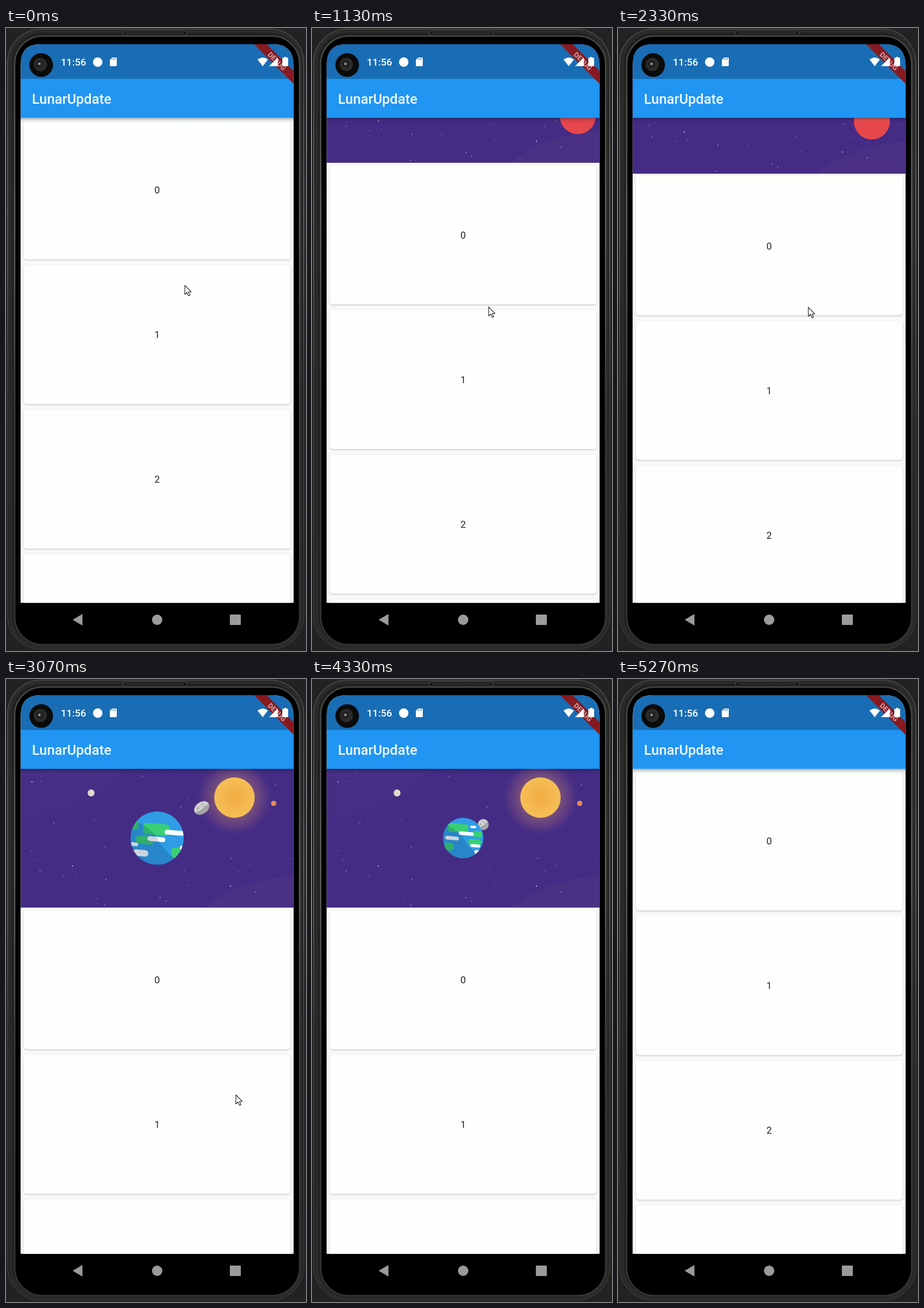
An HTML page that plays this animation: 520 px wide and 1077 px high, repeating every 5.39 s.

```html
<!DOCTYPE html>
<html lang="en">
<head>
<meta charset="utf-8">
<title>Pull to refresh</title>
<style>
  html, body { margin: 0; width: 100%; height: 100%; overflow: hidden; background: #212221; }
  svg { display: block; width: 100vw; height: 100vh; }
  text { font-family: Roboto, "Noto Sans", sans-serif; }
  .num { font-size: 16.8px; fill: #222; text-anchor: middle; }
  .card { fill: #fdfffc; filter: drop-shadow(0 1px 1px rgba(0,0,0,.24)); }
</style>
</head>
<body>
<svg viewBox="0 0 520 1077" preserveAspectRatio="none">
  <defs>
    <linearGradient id="metal" x2="0" y2="1">
      <stop offset="0" stop-color="#434542"/><stop offset=".3" stop-color="#5c5e5b"/>
      <stop offset=".6" stop-color="#3b3d3a"/><stop offset="1" stop-color="#333532"/>
    </linearGradient>
    <linearGradient id="drop" x2="0" y2="1">
      <stop offset="0" stop-color="#000" stop-opacity=".3"/>
      <stop offset=".4" stop-color="#000" stop-opacity=".1"/>
      <stop offset="1" stop-color="#000" stop-opacity="0"/>
    </linearGradient>
    <radialGradient id="sun">
      <stop offset="0" stop-color="#f2ab42"/><stop offset="1" stop-color="#f5c057"/>
    </radialGradient>
    <radialGradient id="glow">
      <stop offset=".5" stop-color="#c98a68" stop-opacity=".42"/>
      <stop offset=".78" stop-color="#a0647a" stop-opacity=".26"/>
      <stop offset="1" stop-color="#6a4080" stop-opacity="0"/>
    </radialGradient>
    <clipPath id="screen"><path d="M25.600 993.500V62Q25.600 28 60 28H462Q498.300 28 498.300 64V993.500Z"/></clipPath>
    <clipPath id="sky"><rect x="25" y="0" width="474" height="240.500"/></clipPath>
    <clipPath id="disc"><circle r="1"/></clipPath>
  </defs>

  <!-- phone body -->
  <rect x="3" y="2" width="513" height="1072" rx="58" fill="#1f211f" stroke="url(#metal)" stroke-width="2"/>
  <rect x="8" y="6" width="503" height="1064" rx="53" fill="none" stroke="#2a2c2a" stroke-width="5"/>
  <rect x="15" y="14" width="494" height="1052" rx="48" fill="#000" stroke="url(#metal)" stroke-width="2.500"/>
  <rect x="203" y="5" width="111" height="8" rx="4" fill="#171817" stroke="#4c4d4c" stroke-width="1"/>
  <path d="M208 9H310" stroke="#404140" stroke-width="3" stroke-dasharray="1.5 1.5"/>

  <g clip-path="url(#screen)">
    <rect x="25" y="28" width="474" height="966" fill="#f8f9f7"/>
    <g id="scene" clip-path="url(#sky)">
      <rect x="25" width="474" height="241" fill="#442c85"/>
      <path d="M25 85Q150 75 212 0H25Z" fill="#4a2f86" opacity=".6"/>
      <path d="M345 241Q395 195 499 185V241Z" fill="#4c3385" opacity=".75"/>
      <g id="stars" fill="#d8d0ee"></g>
      <circle cx="147.500" cy="42" r="6" fill="#e2dac8"/>
      <circle cx="464" cy="60" r="4.600" fill="#e48a5a"/>
      <g id="red">
        <circle r="31" fill="#ee5254"/>
        <path d="M-31 0A31 31 0 0 0 31 0Z" fill="#e6474b"/>
      </g>
      <circle cx="396" cy="50" r="66" fill="url(#glow)"/>
      <circle cx="396" cy="50" r="35" fill="url(#sun)"/>
      <g id="orange">
        <circle r="190" fill="#e9835f"/>
        <path d="M100 -16L187 -34A190 190 0 0 1 100 161Z" fill="#eb977b"/>
      </g>
      <g id="orbit" transform="translate(262 120)">
        <g id="earth"><g clip-path="url(#disc)">
          <rect x="-1" y="-1" width="2" height="2" fill="#2f9de6"/>
          <g id="land"></g>
          <path d="M-.9 -.7Q-.1 -.3 .05 .1Q.3 .5 .68 .78L0 1.2H-1.2Z" fill="#07204a" opacity=".18"/>
        </g></g>
        <g id="moon">
          <circle r="10" fill="#cfcfcf"/>
          <path d="M-10 0A10 10 0 0 0 10 0Q0 4 -10 0Z" fill="#a4a4a6"/>
          <g fill="#b0b0b2"><circle cx="-4" cy="-3" r="2"/><circle cx="3" cy="-5" r="1.400"/><circle cx="4" cy="1" r="1.800"/></g>
        </g>
      </g>
    </g>
    <g id="list"><rect x="25" y="155.400" width="474" height="1100" fill="#f8f9f7"/></g>
    <rect x="25" y="155.400" width="474" height="9" fill="url(#drop)"/>

    <!-- bars -->
    <rect x="25" y="28" width="474" height="60" fill="#196db4"/>
    <rect x="25" y="88" width="474" height="67.400" fill="#2095f2"/>
    <text x="45" y="131" font-size="24" font-weight="500" fill="#f4faff">LunarUpdate</text>
    <path d="M430 28H452L499 75V97Z" fill="#861a21"/>
    <text transform="translate(469.500 57.500) rotate(45)" y="4.200" font-size="12.200" font-weight="700" text-anchor="middle" fill="#cfa6aa">DEBUG</text>
    <text x="95" y="65.200" font-size="17.300" font-weight="500" fill="#fff">11:56</text>
    <g fill="#fff">
      <circle cx="159" cy="59" r="8.200"/>
      <path d="M184 51H191Q192 51 192 52V65Q192 66 191 66H181Q180 66 180 65V55Z"/>
      <path d="M436 54.500Q445 47.500 454 54.500L445 66Z"/>
      <path d="M456 66L471 51V66Z"/>
      <path d="M482 51.500V50H486V51.500H488Q489 51.500 489 52.500V65Q489 66 488 66H480Q479 66 479 65V52.500Q479 51.500 480 51.500Z"/>
    </g>
    <path d="M184 52V55M187 52V55M189.500 52V55" stroke="#196db4"/>
  </g>

  <!-- camera -->
  <circle cx="61" cy="64" r="20.500" fill="#0b0b0b"/>
  <circle cx="59.500" cy="63" r="11.500" fill="#2b2b2a"/>
  <circle cx="58.500" cy="62.500" r="7" fill="#222322"/>
  <circle cx="58" cy="62" r="2" fill="#a5a5a5"/>

  <!-- navigation -->
  <g fill="#9b9b9b">
    <path d="M115.500 1023L132.500 1013V1033Z"/>
    <circle cx="262" cy="1023" r="9"/>
    <rect x="388" y="1014" width="19" height="18" rx="1"/>
  </g>
  <path id="cursor" d="M0 0V15.500L3.600 12.200L6.300 18L8.800 16.900L6.200 11.200H11Z" fill="#fff" stroke="#222" stroke-width="1.100" stroke-linejoin="round"/>
</svg>
<script>
const LOOP = 5390, STEP = 200 / 3;
const $ = id => document.getElementById(id);

function add(parent, tag, attrs, text) {
  const el = document.createElementNS("http://www.w3.org/2000/svg", tag);
  for (const k in attrs) el.setAttribute(k, attrs[k]);
  if (text !== undefined) el.textContent = text;
  return parent.appendChild(el);
}
const move = (el, x, y, more = "") => el.setAttribute("transform", `translate(${x} ${y}) ${more}`);

// Eased value(s) of a table whose rows are [key, ...values].
function at(table, key) {
  if (key <= table[0][0]) return table[0].slice(1);
  for (let i = 1; i < table.length; i++) {
    const a = table[i - 1], b = table[i];
    if (key <= b[0]) {
      const p = (key - a[0]) / (b[0] - a[0]), e = p * p * (3 - 2 * p);
      return a.slice(1).map((v, j) => v + (b[j + 1] - v) * e);
    }
  }
  return table[table.length - 1].slice(1);
}

const pull = [[67, 0], [733, 66], [1270, 80], [1670, 80], [1800, 81], [2333, 96.5],
  [2800, 234], [2930, 240], [4670, 240], [5200, 0]];
const pointer = [[0, 310, 445], [733, 309, 480], [1470, 304, 484], [1800, 303.5, 484],
  [2333, 330, 483], [2870, 398.5, 719]];
const earthSize = [[2720, 0], [2980, 50], [3067, 46], [3270, 34], [3400, 35]];
const orangeX = [[0, -60], [66, -109], [80, -190]];
const redPath = [[66, 560, 200], [81, 447, 154], [96.5, 440, 150], [240, 396, 50]];

for (let i = 0; i < 4; i++) {
  const y = 155 + i * 250;
  add($("list"), "rect", { class: "card", x: 30.8, y: y + 4.8, width: 462.4, height: 240.4, rx: 4.8 });
  add($("list"), "text", { class: "num", x: 262, y: y + 131.3 }, i);
}

const stars = [45,23, 60,22, 77,8, 237,13, 303,66, 315,51, 467,28, 153,88, 172,135, 83,94,
  44,142, 54,157, 115,168, 99,185, 120,182, 59,177, 173,191, 158,225, 171,236, 225,192,
  267,223, 277,229, 316,202, 309,176, 389,203, 403,178, 423,167, 391,155, 432,213, 492,155];
for (let i = 0; i < stars.length; i += 2)
  add($("stars"), "circle", { cx: stars[i], cy: stars[i + 1], r: i % 8 ? .7 : .95, opacity: i % 6 ? .65 : 1 });

// x, y, width, height, drift x, drift y, colour; in planet radii
const green = "#38cf74", cloud = "#f7fbff";
const patches = [
  [-.03, -.33, 1, .42, -.22, -.17, green],
  [-.47, .07, .65, .32, -1.2, 0, green],
  [.75, .55, .45, .38, -1.45, -.13, green],
  [-.85, -.5, .3, .35, -1, 0, green],
  [1.6, -.2, .5, .3, -.9, 0, green],
  [1.6, .2, .65, .28, -1.03, 0, green],
  [.65, -.2, .75, .18, -.5, -.02, cloud],
  [-.03, .04, .68, .18, -.52, -.04, cloud],
  [-.87, .23, .3, .14, -.6, 0, cloud],
  [-.63, .56, .6, .24, -.9, 0, cloud],
  [1, -.55, .3, .12, -.5, 0, cloud],
  [1.1, .38, .5, .15, -.5, 0, cloud],
  [1.2, .7, .3, .2, -.5, 0, cloud]
].map(([x, y, w, h, dx, dy, fill]) => ({
  x, y, dx, dy,
  el: add($("land"), "rect", { x: -w / 2, y: -h / 2, width: w, height: h, rx: Math.min(h / 2, .12), fill })
}));

function drawPlanet(t) {
  const [size] = at(earthSize, t), grown = Math.min(1, size / 35);
  $("orbit").style.display = size > 0 ? "" : "none";
  if (!size) return;
  $("earth").setAttribute("transform", `scale(${size})`);
  const drift = (t - 3067) / 1267;
  for (const p of patches) move(p.el, p.x + p.dx * drift, p.y + p.dy * drift, "rotate(5)");

  const phase = -.2 + (t - 3067) * .006;
  const far = 95 * Math.cos(phase) * grown, behind = Math.sin(phase) > 0;
  const scale = (1 - .07 * Math.sin(phase)) * grown;
  const [stretch] = at([[3067, 1.4], [3500, 1]], t);
  move($("moon"), far * .83, far * -.56, `rotate(-34) scale(${scale * stretch} ${scale})`);
  $("orbit").insertBefore($("moon"), behind ? $("earth") : null);
}

function draw(t) {
  const [s] = at(pull, t);
  move($("list"), 0, s);
  move($("scene"), 0, s - 85);
  $("scene").style.display = s > .2 ? "" : "none";
  move($("orange"), at(orangeX, s)[0], 235);
  move($("red"), ...at(redPath, s));
  drawPlanet(t);
  move($("cursor"), ...at(pointer, t));
  $("cursor").style.display = t < 3260 ? "" : "none";
}

const start = performance.now();
function tick() {
  const t = (performance.now() - start) % LOOP;
  draw(Math.min(79, Math.floor((t + 5) / STEP)) * STEP);
  requestAnimationFrame(tick);
}
tick();
</script>
</body>
</html>
```
